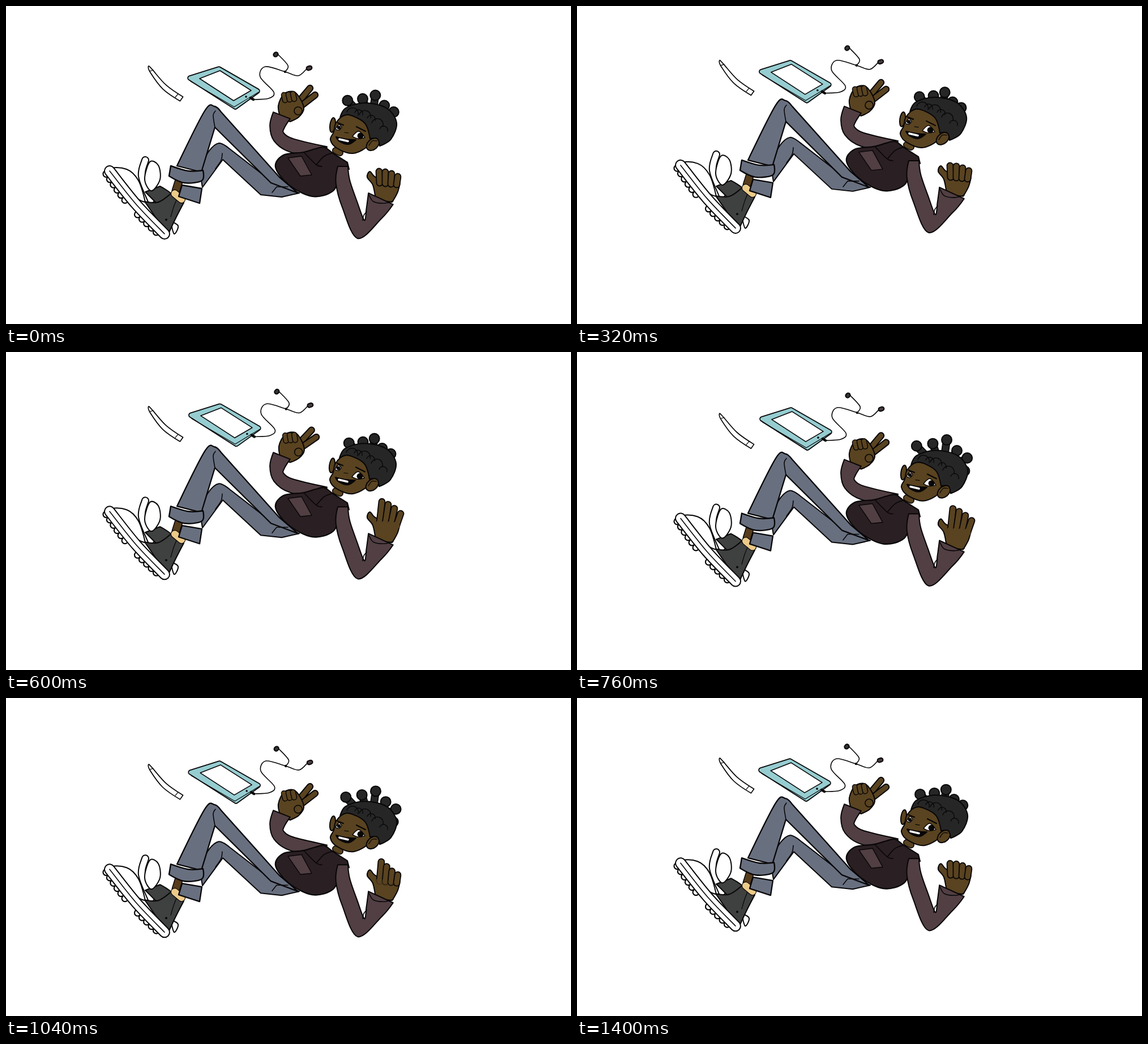
Write an HTML page that moves like this. It is 998 px wide and 561 px high and loops after 1.44 s.

```html
<!DOCTYPE html>
<html lang="en">
<head>
<meta charset="utf-8">
<title>Floating with a tablet</title>
<style>
html, body { margin: 0; width: 100%; height: 100%; overflow: hidden; background: #fff; }
svg { display: block; width: 100%; height: 100%; }
</style>
</head>
<body>
<svg id="stage" viewBox="0 0 998 561" fill="none" stroke-linecap="round" stroke-linejoin="round"></svg>
<script>
const INK = '#080607', SKIN = '#594320', HAIR = '#262627', JEANS = '#687080', TEAL = '#96cdd1';
const SLEEVE = '#513f43', SHIRT = '#2a1f22', SHOE = '#3f4040', SOCK = '#ecca88', WHITE = '#fff';
const LOOP = 1440, STEP = 40, EDGE = 2;
const stage = document.getElementById('stage');

function el(parent, name, attrs = {}) {
  const node = document.createElementNS('http://www.w3.org/2000/svg', name);
  for (const k in attrs) node.setAttribute(k, attrs[k]);
  return parent.appendChild(node);
}
const group = parent => el(parent, 'g');
const move = (node, x, y) => node.setAttribute('transform', `translate(${x.toFixed(2)} ${y.toFixed(2)})`);

// Points are "x,y" or "x,y,radius"; a trailing * makes a corner.
const parse = text => text.split(' ').map(w => {
  const [x, y, r] = w.split(',').map(parseFloat);
  return { x, y, r, sharp: w.endsWith('*') };
});

function smooth(p, closed) {
  const n = p.length;
  const at = i => closed ? p[(i + n) % n] : p[Math.max(0, Math.min(n - 1, i))];
  const slope = i => at(i).sharp ? [0, 0] : [(at(i + 1).x - at(i - 1).x) / 6, (at(i + 1).y - at(i - 1).y) / 6];
  let d = `M${p[0].x} ${p[0].y}`;
  for (let i = 0; i < (closed ? n : n - 1); i++) {
    const a = at(i), b = at(i + 1), s = slope(i), e = slope(i + 1);
    d += `C${a.x + s[0]} ${a.y + s[1]} ${b.x - e[0]} ${b.y - e[1]} ${b.x} ${b.y}`;
  }
  return d + (closed ? 'Z' : '');
}

const outline = (g, p, fill, width) =>
  el(g, 'path', { d: smooth(p, true), fill, stroke: INK, 'stroke-width': width });
const shape = (g, text, fill, width = EDGE) => outline(g, parse(text), fill, width);
const line = (g, text, width = 1.6, stroke = INK) =>
  el(g, 'path', { d: smooth(parse(text)), stroke, 'stroke-width': width });
const oval = (g, cx, cy, rx, ry, turn, fill, width = EDGE) => el(g, 'ellipse', {
  cx, cy, rx, ry, fill, stroke: INK, 'stroke-width': width, transform: `rotate(${turn} ${cx} ${cy})`
});
const dot = (g, x, y, r, fill, width = 0) => oval(g, x, y, r, r, 0, fill, width);

// A tube of radius r with an ink edge; returns a setter for its path.
function tube(g, d, r, fill, edge = EDGE) {
  const layers = [[INK, r * 2 + edge * 2], [fill, r * 2]].map(([stroke, width]) =>
    el(g, 'path', { d, stroke, fill: d.endsWith('Z') ? fill : 'none', 'stroke-width': width }));
  return path => layers.forEach(p => p.setAttribute('d', path));
}
const seg = (x1, y1, x2, y2) => `M${x1} ${y1}L${x2} ${y2}`;

// A tapering limb: offsets a centre line by the radius at each point.
function limb(g, text, fill, width = EDGE) {
  const p = parse(text), last = p.length - 1;
  const side = sign => p.map((c, i) => {
    const a = p[Math.max(0, i - 1)], b = p[Math.min(last, i + 1)];
    const len = Math.hypot(b.x - a.x, b.y - a.y), k = sign * c.r / len;
    return { x: c.x + (a.y - b.y) * k, y: c.y + (b.x - a.x) * k, sharp: i === 0 || i === last };
  });
  return outline(g, [...side(1), ...side(-1).reverse()], fill, width);
}

function key(t, keys) {
  let value = keys[0][1];
  for (let i = 1; i < keys.length; i++) {
    const [t0, a] = keys[i - 1], [t1, b] = keys[i];
    const k = Math.max(0, Math.min(1, (t - t0) / (t1 - t0)));
    value += (b - a) * (1 - Math.cos(Math.PI * k)) / 2;
  }
  return value;
}

function drawTablet(g) {
  tube(g, smooth(parse('325,127* 376,111* 444,150* 405,178*'), true), 3, TEAL, 1.8);
  line(g, '326,133* 403,178* 446,152', 1.1);
  shape(g, '342,128* 378,114* 433,149* 402,167*', WHITE, 1.6);
  dot(g, 424, 160, 1.8, INK);
  line(g, '432,162 437,165', 4.5);
  line(g, '437,165 464,163 473,152 449,125 458,107 493,116 516,123 531,111');
  line(g, '493,116 498,105 479,84');
  dot(g, 493, 116, 2.2, INK);
  tube(g, seg(476, 86, 477, 85), 2.6, '#333');
  tube(g, seg(534, 110, 537, 109), 2.4, '#463a40');
}

function drawPen(g) {
  limb(g, '252,106,0.5 257,115,3 280,143,4.5 310,164,4.5', WHITE, 1.7);
  line(g, '254,115 260,113', 1.2);
  line(g, '299,161 304,155', 1.2);
}

function drawFarShoe(g) {
  shape(g, '291,380* 304,388 297,402', WHITE);
  tube(g, smooth(parse('246,272 240,300 256,342')), 5, WHITE);
  shape(g, '246,328* 272,318* 294,335 268,350*', SHOE);
  shape(g, '254,275 269,281 272,306 257,326 245,306', WHITE);
}

function drawNearShoe(g) {
  const toe = { x: 183, y: 291 }, length = 147, dir = { x: 0.66, y: 0.75 };
  for (let i = 0; i <= 12; i++) {
    const t = i / 13, out = 8 + 6 * Math.sin(Math.PI * t);
    if (t > 0.42 && t < 0.6) continue;
    dot(g, toe.x + dir.x * length * t - dir.y * out, toe.y + dir.y * length * t + dir.x * out, 5.5, WHITE, 2.2);
  }
  shape(g, '186,290 213,288 234,308 246,346* 225,335', WHITE);
  shape(g, '245,345* 269,346 291,331* 314,347* 299,376 286,404*', SHOE);
  const sole = '183,291 230,350 280,402';
  tube(g, smooth(parse(sole)), 8, WHITE);
  line(g, sole);
  line(g, '302,340 296,355 291,372', 1.2);
  dot(g, 283, 377, 2, INK);
}

function drawLegs(g) {
  tube(g, seg(305, 310, 300, 326), 6, '#553c1c', 1.5);
  tube(g, seg(298, 331, 310, 341), 6, SOCK, 1.2);
  shape(g, '342,290* 357,258 376,242 395,252* 470,310* 518,330* 487,337* 450,333* 383,271* 347,320*', JEANS);
  line(g, '382,260 380,272 370,287');
  shape(g, '302,282* 351,185 368,177 380,187* 483,302* 516,330* 468,312* 369,214* 345,293*', JEANS, 2.3);
  line(g, '370,185 366,193 369,214');
  line(g, '470,329 478,319* 498,319');
  shape(g, '311,316* 346,322* 342,348* 305,336*', JEANS, 2.3);
  shape(g, '291,282* 322,291 348,290* 346,308 315,312 288,300*', JEANS, 2.4);
}

function drawPeace(g) {
  tube(g, seg(516, 170, 537, 145), 4.2, SKIN);
  tube(g, seg(524, 174, 546, 157), 4.2, SKIN);
  shape(g, '485,198* 481,176 491,155 508,151 520,164 526,182 517,196 502,204*', SKIN);
  for (let i = 0; i < 3; i++) {
    const x = 491 + 8 * i, y = 157 - i;
    tube(g, seg(x, y, x + 2, y + 9), 3.8, SKIN, 1.5);
  }
  dot(g, 516, 185, 7, SKIN, 1.6);
}

function drawTorso(g) {
  shape(g, '476,284 490,263 525,258 546,252 562,249 578,260 603,276* 606,288* 592,294 578,326 541,336 499,315', SHIRT, 2.2);
  shape(g, '498,268* 522,265* 540,298* 520,300*', SLEEVE, 1.4);
  line(g, '527,259 548,280 558,283');
  line(g, '577,259 562,265 549,279');
  tube(g, seg(582, 255, 590, 259), 4.5, SKIN, 1.5);
}

function drawRightArm(g) {
  limb(g, '595,283,9 595,310,12.5 607,350,14 627,394,17 650,366,16 662,340,24', SLEEVE);
  line(g, '630,378 632,369 637,363');
  line(g, '641,333 649,345 668,348 684,344');
}

function drawEye(g, lid, x, y, r) {
  shape(g, lid, WHITE, 1.4);
  dot(g, x, y, r, INK);
}

function drawFace(g) {
  oval(g, 577, 210, 4.8, 13, 8, SKIN);
  shape(g, '583,206 600,192 628,200 643,222 641,245 613,260 585,251 573,236 579,222', SKIN);
  oval(g, 648, 244, 13, 9, -42, SKIN);
  line(g, '641,246 647,238 655,238', 1.3);
  drawEye(g, '582,217* 588,209 593,214* 588,219', 588, 214.5, 3.3);
  drawEye(g, '612,230* 623,221 634,232* 622,234', 626, 229, 5.4);
  line(g, '586,206 596,210', 2.2);
  line(g, '619,213 635,221', 2.2);
  line(g, '598,223 605,224', 1.2);
  shape(g, '583,231* 602,235 618,236* 605,244 589,239', INK);
  line(g, '589,235 604,238.5', 3.6, WHITE);
}

function drawHair(g) {
  shape(g, '590,197* 600,180 633,171 672,180 690,206 680,235 660,247* 656,234 643,234* 634,207 606,192', HAIR);
  for (let i = 0; i < 6; i++) {
    const x = 612 + 11 * i, y = 187 + 1.2 * i * i, r = 10 - 3 * (i % 2);
    el(g, 'path', { d: `M${x - r} ${y}a${r} ${r} 0 0 1 ${2 * r} ${r * 0.6}`, stroke: INK, 'stroke-width': 1.3 });
  }
}

// Tufts fan out from the crown and stretch or squash along their own direction.
function makeTufts(g) {
  const cx = 645, cy = 210;
  return Array.from({ length: 6 }, (_, i) => {
    const a = (26 * i - 134) * Math.PI / 180, reach = 60 - 3.5 * i - 8 * (i % 2);
    const set = tube(g, '', 5.5, HAIR, 1.5), knob = dot(g, 0, 0, 9, HAIR, EDGE);
    return squash => {
      const r = reach - squash, x = cx + r * Math.cos(a), y = cy + r * Math.sin(a);
      set(seg(cx + 30 * Math.cos(a), cy + 30 * Math.sin(a), x, y));
      move(knob, x, y);
    };
  });
}

// Each finger opens from a folded knuckle; they close one after another from the little finger.
function makeHand(g) {
  shape(g, '653,342* 648,316 638,302 643,292 655,303 692,306 693,325 682,346*', SKIN);
  const fingers = [0, 1, 2, 3].map(i => {
    const x = 660 + 10 * i, y = 312 + i;
    const set = tube(g, '', 4.6, SKIN, 1.8), patch = dot(g, x - i / 2, y + 1, 7, SKIN);
    return t => {
      const open = key(t, [[370, 0], [530 + 15 * i, 1], [960 - 50 * i, 1], [1220 - 60 * i, 0]]);
      set(seg(x, y, 659 + 11 * i + 5 * open, 292 + i * i - (18 - 4 * i) * open));
      patch.setAttribute('opacity', open);
    };
  });
  return t => fingers.forEach(set => set(t));
}

const tablet = group(stage), pen = group(stage), body = group(stage);
drawTablet(tablet);
drawPen(pen);
drawFarShoe(body);
drawNearShoe(body);
drawLegs(body);
const peace = group(body);
drawPeace(peace);
limb(body, '487,193,16 479,213,13 482,231,11 505,246,12 565,258,10', SLEEVE);
drawTorso(body);
const setHand = makeHand(body);
drawRightArm(body);
const head = group(body);
const tufts = makeTufts(head);
drawFace(head);
drawHair(head);

const drift = t => key(t, [[0, 0], [480, -13.5], [960, 12], [LOOP, 0]]);
const hover = t => key(t, [[0, 0], [520, -16.5], [1110, 4.8], [LOOP, 0]]);
const squash = t => key(t, [[0, 0], [320, 5], [600, 5], [760, -5], [1240, -4], [1400, 4]]);

function draw(ms) {
  const t = ms < 2 * STEP ? 0 : Math.floor(ms / STEP) * STEP;
  const turn = 2 * Math.PI * t / LOOP, y = drift(t);
  move(body, 0, y);
  move(pen, 0, y);
  move(tablet, 1 - Math.cos(turn), hover(t));
  move(head, -2 * Math.max(0, Math.sin(turn)), 0);
  peace.setAttribute('transform', `rotate(${key(t, [[320, 0], [600, 3], [760, 0]])} 492 198)`);
  tufts.forEach(set => set(squash(t)));
  setHand(t);
}

const start = performance.now();
function tick() {
  draw((performance.now() - start) % LOOP);
  requestAnimationFrame(tick);
}
tick();
</script>
</body>
</html>
```
